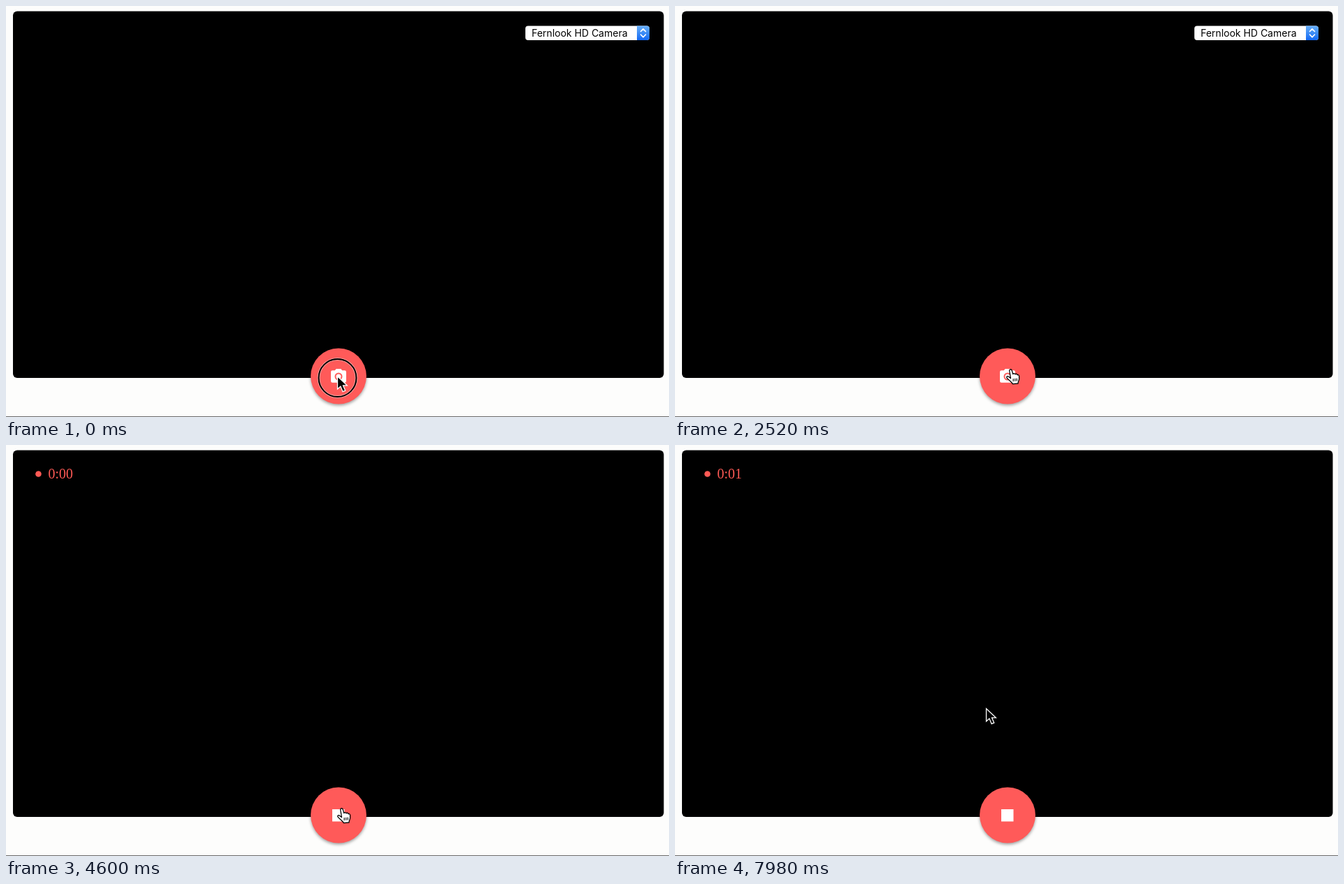
An HTML page that plays this animation: 951x589 px, repeating every 8000 ms.

```html
<!DOCTYPE html>
<html lang="en">
<head>
<meta charset="utf-8">
<title>Camera recorder</title>
<style>
  html, body { margin: 0; width: 100%; height: 100%; overflow: hidden; background: #fdfdfc; }
  svg { display: block; }
  .label { font: 14px Inter, "Open Sans", sans-serif; }
  .timer { font: 20px "Liberation Serif", "Noto Serif", serif; }
  .button { filter: drop-shadow(0 2px 2px rgba(0, 0, 0, .38)); }
</style>
</head>
<body>
<svg width="951" height="589" viewBox="0 0 951 589">
  <defs>
    <linearGradient id="blue" x2="0" y2="1">
      <stop stop-color="#69b1fa"/>
      <stop offset="1" stop-color="#1268f3"/>
    </linearGradient>
  </defs>
  <rect width="951" height="589" fill="#fdfdfc"/>
  <rect x="10" y="7.5" width="933.5" height="525.5" rx="6"/>
  <rect y="588" width="951" height="1" fill="#686868"/>

  <g id="picker">
    <rect x="745" y="28.5" width="178" height="20.5" rx="4" fill="#fff"/>
    <path d="M905 28.5h14a4 4 0 0 1 4 4v12.500a4 4 0 0 1-4 4h-14z" fill="url(#blue)"/>
    <path d="M910.500 36.500l3.500-3.700 3.500 3.700M910.500 41l3.500 3.700 3.500-3.700" fill="none"
          stroke="#fff" stroke-width="1.700" stroke-linecap="round" stroke-linejoin="round"/>
    <text class="label" x="754" y="44">Fernlook HD Camera</text>
  </g>

  <g id="status" fill="#ff5a55">
    <circle cx="46.500" cy="41.500" r="4.300"/>
    <text id="timer" class="timer" x="60.500" y="47.500">0:00</text>
  </g>

  <circle class="button" cx="477" cy="530.500" r="40" fill="#ff5a59"/>
  <g id="camera" transform="translate(463.800 517.800) scale(1.100)">
    <path fill="#fff" d="M9 2L7.200 4H4a2 2 0 0 0-2 2v12a2 2 0 0 0 2 2h16a2 2 0 0 0 2-2V6a2 2 0 0 0-2-2h-3.200L15 2z"/>
    <circle cx="12" cy="12" r="4.100" fill="none" stroke="#ff5a59" stroke-width="1.800"/>
  </g>
  <rect id="stop" x="468" y="522" width="17.500" height="17.500" fill="#fff"/>

  <g id="ring" fill="none">
    <circle cx="475.500" cy="533" r="27" stroke="#fff" stroke-opacity=".4" stroke-width="4"/>
    <circle cx="475.500" cy="533" r="27" stroke="#000" stroke-width="2"/>
  </g>

  <g id="pointer">
    <path id="arrow" d="M.500 .800V19L4.900 15.100 8.100 22.700 11.700 21.200 8.500 13.800H14.300z"
          stroke="#fff" stroke-width="1.300"/>
    <g id="hand" transform="translate(0 2)" stroke="#000" stroke-width="1.300" stroke-linejoin="round">
      <path fill="#fff" d="M-.200 3C-.800 .600 2.400-.200 3.200 2.200L4.800 7.600C5.200 6.200 7.600 6.200 8 7.800 8.800 6.800 10.800 7 11 8.800 12 8 13.600 8.800 13.600 10.400V14C13.600 17 12 18 12 21L4.400 21.700C3.600 19.200-.600 17-4 12.800-5 11-2.800 10-1.400 11.200L1.500 13.500z"/>
      <path d="M5.200 14v4M7.800 13.800v4M10.300 13.600v4" stroke-width="1.100"/>
    </g>
  </g>
</svg>
<script>
const LOOP = 8000, RECORD_AT = 3440, SECOND_AT = 6200;
const el = id => document.getElementById(id);
const show = (id, on) => el(id).style.display = on ? '' : 'none';
const mix = (a, b, k) => a + (b - a) * k;

function ease(t, start, duration) {
  const k = Math.min(1, Math.max(0, (t - start) / duration));
  return k * k * (3 - 2 * k);
}

function draw(now) {
  const t = now % LOOP;
  const recording = t >= RECORD_AT;
  show('picker', !recording);
  show('camera', !recording);
  show('status', recording);
  show('stop', recording);
  show('ring', t < 160);
  el('timer').textContent = t < SECOND_AT ? '0:00' : '0:01';

  const settle = ease(t, 300, 700), leave = ease(t, 7180, 620);
  const x = mix(mix(475, 480, settle), 446, leave);
  const y = mix(mix(530, 518, settle), 377, leave);
  const pressed = t < 400 || (t >= 3340 && t < RECORD_AT);
  const arrow = pressed || y < 491;
  show('arrow', arrow);
  show('hand', !arrow);
  el('pointer').setAttribute('transform', `translate(${x} ${y})`);
}

const began = performance.now();
function tick() {
  draw(performance.now() - began);
  requestAnimationFrame(tick);
}
tick();
</script>
</body>
</html>
```
